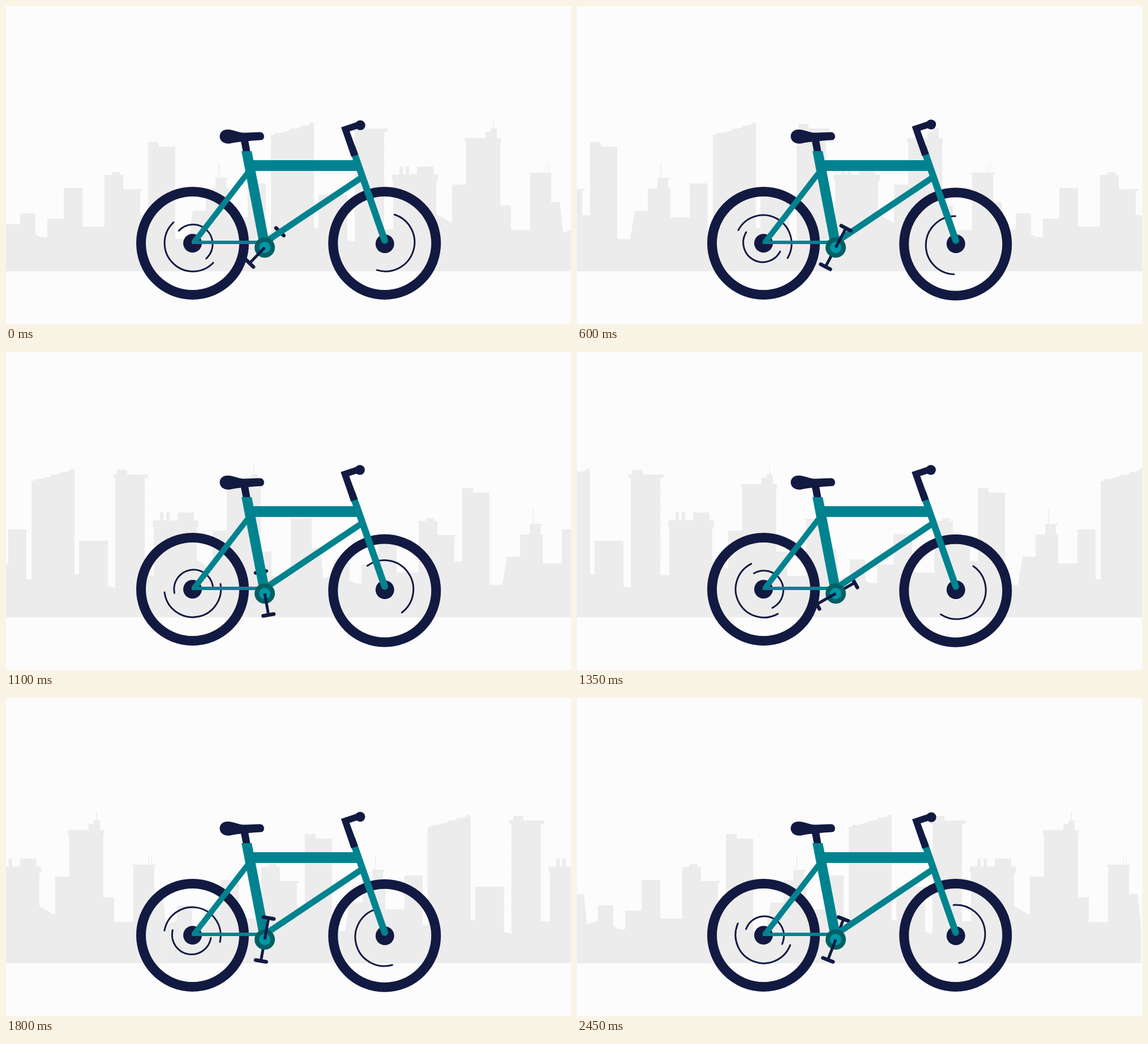
Write an HTML page without scripts that moves like this. It is 998 px wide and 561 px high and loops after 2500 ms.

```html
<!DOCTYPE html>
<html lang="en">
<head>
<meta charset="utf-8">
<title>City bike</title>
<style>
  @property --turn { syntax: "<angle>"; inherits: true; initial-value: 0deg; }
  @property --pan { syntax: "<length>"; inherits: true; initial-value: 0px; }
  @property --bump { syntax: "<length>"; inherits: true; initial-value: 0px; }

  html, body { margin: 0; width: 100%; height: 100%; overflow: hidden; background: #fcfcfc; }
  svg {
    display: block;
    --navy: #121a42;
    --teal: #00838f;
    animation: ride 2.5s infinite, bounce 2.5s linear infinite;
  }

  .skyline { fill: #ececec; transform: translateX(calc(-1 * var(--pan))); }
  .spin { transform: rotate(var(--turn)); }
  .sprung { transform: translateY(var(--bump)); }
  .bars { transform: translate(calc(-.3 * var(--bump)), calc(-.9 * var(--bump))); }

  .navy { fill: var(--navy); }
  .tyre { fill: none; stroke: var(--navy); stroke-width: 17; }
  .arc { fill: none; stroke: var(--navy); stroke-width: 3; stroke-linecap: round; }
  .frame { fill: none; stroke: var(--teal); }
  .crank { fill: none; stroke: var(--navy); stroke-width: 5; }
  .pedal { stroke-width: 6.5; stroke-linecap: round; }

  /* The ride advances in 50 ms ticks. */
  @keyframes ride {
    0%   { --turn: 0deg;   --pan: 0px;   animation-timing-function: step-end; }
    4%   { --turn: 22deg;  --pan: 29px;  animation-timing-function: steps(4); }
    12%  { --turn: 79deg;  --pan: 108px; animation-timing-function: steps(6); }
    24%  { --turn: 164deg; --pan: 228px; animation-timing-function: steps(10); }
    44%  { --turn: 306deg; --pan: 423px; animation-timing-function: steps(10); }
    64%  { --turn: 447deg; --pan: 619px; animation-timing-function: steps(9); }
    82%  { --turn: 580deg; --pan: 804px; animation-timing-function: steps(8); }
    98%  { --turn: 697deg; --pan: 966px; animation-timing-function: step-end; }
    100% { --turn: 720deg; --pan: 978px; }
  }
  @keyframes bounce {
    0%, 3%, 26%, 50%, 74%, 98%, 100% { --bump: 0px; }
    8%  { --bump: 5.2px; }
    12% { --bump: 3px; }
    24% { --bump: 1.5px; }
    34% { --bump: 5.2px; }
    44% { --bump: 2.6px; }
    58% { --bump: 5.2px; }
    64% { --bump: 4.2px; }
    82% { --bump: 5.2px; }
    90% { --bump: 1.5px; }
  }
</style>
</head>
<body>
<svg width="998" height="561" viewBox="0 0 998 561">
  <defs>
    <g id="city">
      <path d="M6 468V400L21 394H25V366H52V403L62 408H73V375H102V321H135V389H174V298H187V293H201V298H207V323H241V326H237V369H251V240H270V248H299V411H322L330 361H353V322H370V303H392V306H389V322H393V373H427V313H459V401H468
        V228L475 226V224H480V225L503 219V216H508V217L520 214V211H525V212L537 209V206H544V392H552V333H603V413L616 416V222H612V216H619V208H637V216H674V222H668V394H684V309H682V297H695V283H701V297H706V283H712V297H726V283H755V297H763V309H760V367L788 383V315H813V241H811V233H847V222H856V216H867V233H874V241H873V352H892V395H926V297H924V294H965V297H963V346H978L984 400V468Z"/>
      <path d="M375.500 277h1.500v27h-1.500zM860.500 201h1.500v16h-1.500zM952.500 278h1v17h-1zM958 275h1v20h-1z"/>
      <path d="M615 250h54v2h-54zM615 279h54v2h-54zM615 308h54v2h-54zM615 337h54v2h-54zM615 364h54v2h-54z"/>
    </g>
    <g id="arm">
      <path d="M0 0H38.500"/>
      <path class="pedal" d="M38.500-9.500V9.500"/>
    </g>
  </defs>

  <g class="skyline">
    <path d="M0 385H25V468H0z"/>
    <use href="#city"/>
    <use href="#city" x="978"/>
  </g>

  <g transform="translate(329.500 418.500)">
    <circle class="tyre" r="91"/>
    <g class="spin">
      <circle class="arc" r="50" pathLength="360" stroke-dasharray="183 177" transform="translate(.6 -.3) rotate(44)"/>
      <circle class="arc" r="34.500" pathLength="360" stroke-dasharray="185 175" transform="translate(1 1.500) rotate(223)"/>
    </g>
    <circle class="navy" r="16.500"/>
  </g>

  <g transform="translate(668.700 418.500)">
    <g class="sprung">
      <circle class="tyre" r="91"/>
      <g class="spin">
        <circle class="arc" r="51.300" pathLength="360" stroke-dasharray="179 181" transform="translate(1.700 -1.700) rotate(-72)"/>
      </g>
      <circle r="16.500" fill="#fcfcfc"/>
    </g>
    <circle class="navy" cx=".5" cy="1" r="16.500"/>
  </g>

  <g class="crank" transform="translate(457 426)">
    <g class="spin"><use href="#arm" transform="rotate(314)"/></g>
  </g>

  <path class="navy" d="M415 239L428 237L431.500 257H418.500Z"/>
  <path class="navy" d="M390 218C402 217 408 224 424 223.500L448 222.500C458 222.500 458 236 451 236.500C430 238 412 239 396 242.500C373 245 372 219 390 218Z"/>

  <g class="frame">
    <path stroke-width="6" d="M328 417H457"/>
    <path stroke-width="10" d="M428 293L332 417"/>
    <path stroke-width="11" d="M460 415L629 302"/>
    <path stroke-width="19" d="M432 281.500H622"/>
    <path stroke-width="12" d="M611 248L667 408"/>
    <path stroke-width="12" stroke-linecap="round" d="M667 408L669 413.500"/>
  </g>
  <path fill="var(--teal)" d="M416 256H434L464 412H446Z"/>

  <g class="bars navy">
    <path d="M610 266L592 214L622 204L626 215L607 221L622 262Z"/>
    <circle cx="625.800" cy="210.300" r="8.800"/>
  </g>

  <g transform="translate(457 426)">
    <circle r="18" fill="#006064"/>
    <circle r="10" fill="#0097a7"/>
    <g class="spin crank"><use href="#arm" transform="rotate(134)"/></g>
  </g>
</svg>
</body>
</html>
```
